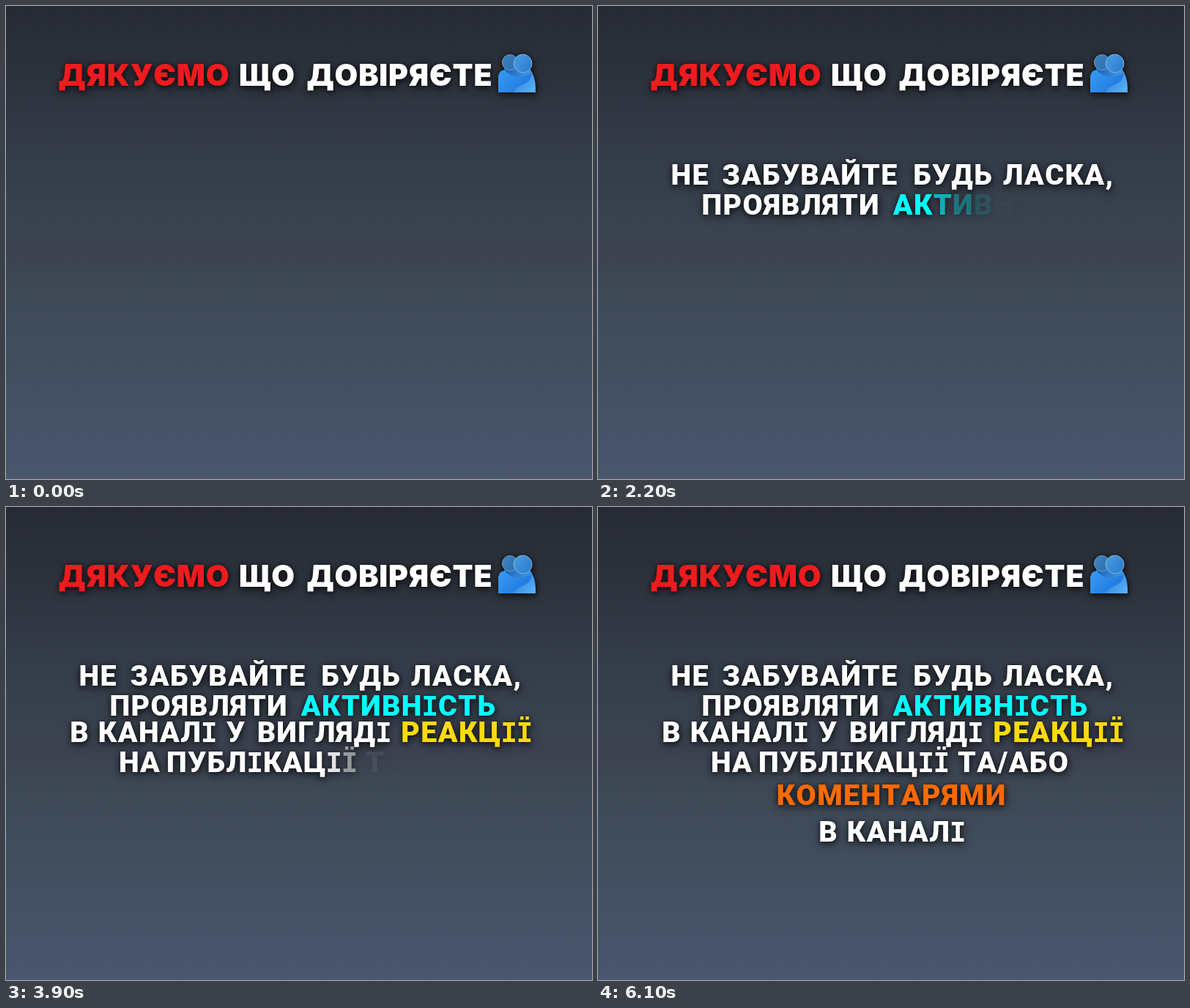
These frames come from a looping animation (800x646 px, 8 s). An HTML page with a canvas:

```html
<!DOCTYPE html>
<html lang="uk">
<head>
<meta charset="utf-8">
<style>
  html, body { margin: 0; width: 100%; height: 100%; overflow: hidden; }
  body {
    background: linear-gradient(#262a34 0, #2d333e 16%, #343c49 32%, #3a4350 47%,
      #3d4151 52%, #3d4855 58%, #424e5e 74%, #465267 88%, #4b566f 100%);
  }
  canvas {
    display: block;
    filter: drop-shadow(0 1px 3px rgba(0, 0, 0, .5)) drop-shadow(1px 3px 6px rgba(0, 0, 0, .6));
  }
</style>
</head>
<body>
<canvas id="stage" width="800" height="646"></canvas>
<script>
const ctx = document.getElementById('stage').getContext('2d');
const LOOP = 8000, STEP = 100;
const SPEED = 0.038;    // letters per ms
const FADE = 4.5;       // letters fading at once

const WHITE = '#fff', RED = '#f01b1f', CYAN = '#00ffff', YELLOW = '#ffda0c', ORANGE = '#ff6a00';
const TITLE = { font: '900 41px Inter, sans-serif', spacing: 0.8 };
const BODY = {
  font: '900 39.4px Roboto, sans-serif',
  slabFont: '700 38px "DejaVu Sans Mono", monospace',
  slabTrim: 3,          // side bearing taken off the monospaced letters
  spacing: 1.4
};

// Words are [text, centre x, colour].
const title = { y: 109, start: -LOOP, style: TITLE, words: [
  ['ДЯКУЄМО', 188, RED], ['ЩО', 356], ['ДОВІРЯЄТЕ', 537]] };
const lines = [
  { y: 244, start: 985, words: [['НЕ', 125], ['ЗАБУВАЙТЕ', 289], ['БУДЬ', 484], ['ЛАСКА,', 628]] },
  { y: 285, start: 1790, words: [['ПРОЯВЛЯТИ', 262.5], ['АКТИВНІСТЬ', 535.5, CYAN]] },
  { y: 321, start: 2645, words: [['В', 100], ['КАНАЛІ', 206.5], ['У', 313.5], ['ВИГЛЯДІ', 434], ['РЕАКЦІЇ', 628.5, YELLOW]] },
  { y: 362, start: 3500, words: [['НА', 182], ['ПУБЛІКАЦІЇ', 349], ['ТА/АБО', 566.5]] },
  { y: 407, start: 4490, words: [['КОМЕНТАРЯМИ', 400, ORANGE]] },
  { y: 457, start: 5020, words: [['В', 314], ['КАНАЛІ', 420.5]] }
];

function layOut(text, style) {
  return [...text].map(letter => {
    const slab = style.slabFont && 'ІЇ'.includes(letter);
    const font = slab ? style.slabFont : style.font;
    const trim = slab ? style.slabTrim : 0;
    ctx.font = font;
    return { letter, font, trim, width: ctx.measureText(letter).width - trim };
  });
}

function drawLine({ y, start, words, style = BODY }, time) {
  const front = (time - start) * SPEED;
  let index = 0;
  for (const [text, centre, color = WHITE] of words) {
    const glyphs = layOut(text, style);
    const total = glyphs.reduce((sum, g) => sum + g.width, 0) + style.spacing * (text.length - 1);
    let x = centre - total / 2;
    ctx.fillStyle = color;
    for (const { letter, font, trim, width } of glyphs) {
      const shown = Math.min(1, Math.max(0, (front - index++) / FADE));
      ctx.globalAlpha = shown * shown;
      ctx.font = font;
      ctx.fillText(letter, x - trim / 2, y);
      x += width + style.spacing;
    }
    index++;   // the space
  }
  ctx.globalAlpha = 1;
}

function blend(y0, y1, from, to) {
  const gradient = ctx.createLinearGradient(680, y0, 715, y1);
  gradient.addColorStop(0, from);
  gradient.addColorStop(1, to);
  return gradient;
}

function fillShape(path, fill) {
  ctx.fillStyle = fill;
  ctx.fill(new Path2D(path));
}

function drawHead(x, y, r, fill, rim) {
  ctx.beginPath();
  ctx.arc(x, y, r, 0, Math.PI * 2);
  ctx.fillStyle = fill;
  ctx.fill();
  ctx.strokeStyle = rim;
  ctx.lineWidth = 1;
  ctx.stroke();
}

function drawHug() {
  fillShape('M680 118V84H714Q723 96 723 112V118Z', blend(88, 118, '#1c62bd', '#55aef8'));
  drawHead(688, 77, 10.5, blend(66, 88, '#3f83bd', '#1f5ea8'), '#6f9fb4');
  drawHead(705.5, 78.5, 12.5, blend(66, 92, '#5aa9e6', '#2a7ad2'), '#7fb9d8');
  fillShape('M672 118V96Q673 88 681 87Q687 98 704 96Q713 94 717 91Q719 100 709 106Q696 110 692 118Z',
    blend(88, 118, '#3596f0', '#1d73dc'));
}

function frame(now) {
  const time = Math.floor(now % LOOP / STEP) * STEP;
  ctx.clearRect(0, 0, 800, 646);
  drawLine(title, time);
  drawHug();
  lines.forEach(line => drawLine(line, time));
  requestAnimationFrame(frame);
}
requestAnimationFrame(frame);
</script>
</body>
</html>
```
